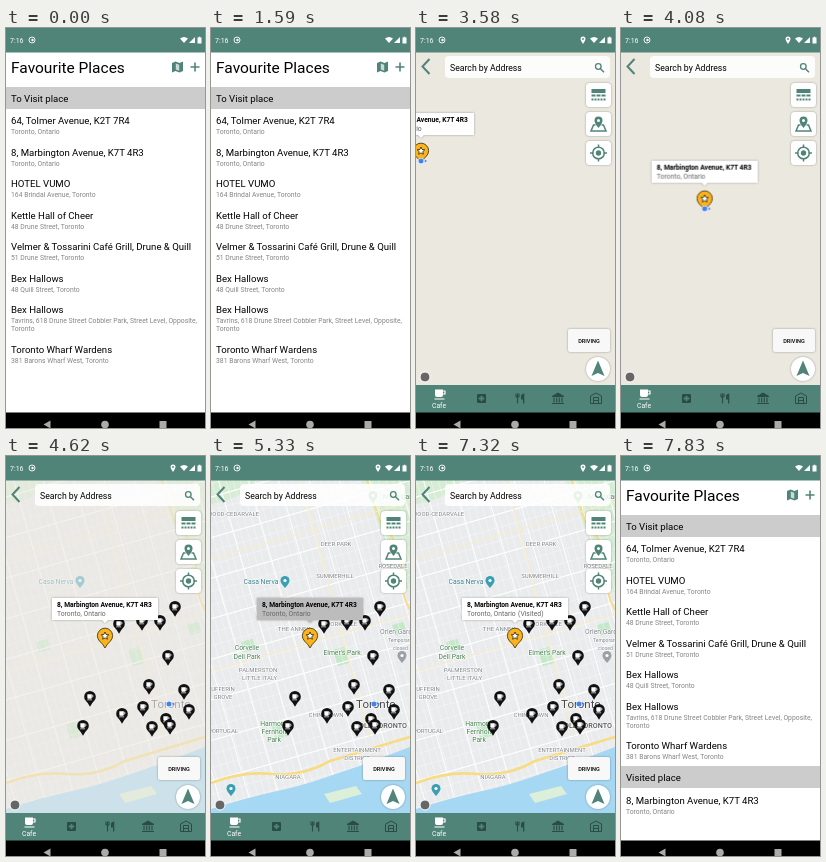
Recreate the animation shown at these times as an HTML page. Size 199 by 400 pixels, loop 8000 ms.

```html
<!DOCTYPE html>
<html lang="en">
<head>
<meta charset="utf-8">
<title>Favourite places</title>
<style>
html, body { margin: 0; width: 100%; height: 100%; overflow: hidden; background: #fff; }
svg { display: block; width: 100%; height: 100%; font-family: Roboto, Arial, sans-serif; }
.title { font-size: 15.5px; }
.name { font-size: 9.6px; }
.sub { font-size: 6.8px; fill: #858585; }
.label { font-size: 6px; fill: #7d8287; text-anchor: middle; paint-order: stroke; stroke: #fff; stroke-width: 1.2px; stroke-linejoin: round; }
.place { font-size: 6.8px; }
.start { text-anchor: start; }
.green { fill: #42804d; }
.teal { fill: #347d8b; }
.card { filter: drop-shadow(0 .7px .9px #0005); }

/* Every part shares one 8 s clock */
.screen, .tiles, .pinned, .bubble, .pan, .nearDot, .zoomed, .streets, .early, .late,
.press, .visited, .before, .after { animation: 8s step-end infinite; }
.screen { animation-name: screen; }
.tiles { animation-name: tiles; }
.pinned { animation-name: pinned; }
.bubble { animation-name: bubble; }
.pan { animation-name: pan; }
.nearDot { animation-name: nearDot; }
.zoomed { animation-name: zoomed; }
.streets { animation-name: streets; }
.early { animation-name: early; }
.late { animation-name: late; }
.press { animation-name: press; }
.visited { animation-name: visited; }
.before { animation-name: before; }
.after { animation-name: after; }

@keyframes screen {
  0% { opacity: 0; transform: translateY(24px); }
  31% { opacity: 0; transform: translateY(24px); animation-timing-function: ease-out; }
  35.625% { opacity: 1; transform: none; }
  93.625% { opacity: 1; transform: none; animation-timing-function: ease-in; }
  96.25%, 100% { opacity: 0; transform: translateY(24px); }
}
@keyframes tiles { 0% { fill: #fafafa; } 40.25%, 100% { fill: #ebe8e0; } }
@keyframes pinned { 0% { opacity: 0; } 41.75%, 100% { opacity: 1; } }
@keyframes bubble { 0% { opacity: 0; } 43.25%, 100% { opacity: 1; } }
@keyframes pan {
  0% { transform: translate(-94px, -57px); }
  46.875% { transform: translate(-94px, -57px); animation-timing-function: ease-in-out; }
  52.625%, 100% { transform: none; }
}
@keyframes nearDot { 0% { opacity: 1; } 54.625%, 100% { opacity: 0; } }
@keyframes zoomed { 0% { opacity: 0; } 55.375%, 100% { opacity: 1; } }
@keyframes streets {
  0% { opacity: 0; } 54.625% { opacity: .3; } 57.75% { opacity: .45; }
  58.75% { opacity: .6; } 60.5% { opacity: .85; } 62%, 100% { opacity: 1; }
}
@keyframes early { 0% { opacity: 0; } 55.375% { opacity: .4; } 60.5%, 100% { opacity: 1; } }
@keyframes late { 0% { opacity: 0; } 60.5% { opacity: .6; } 62%, 100% { opacity: 1; } }
@keyframes press { 0% { fill: #fff; } 66.625% { fill: #bcbcbc; } 68.125%, 100% { fill: #fff; } }
@keyframes visited { 0% { opacity: 0; } 68.125%, 100% { opacity: 1; } }
@keyframes before { 0% { opacity: 1; } 40.25%, 100% { opacity: 0; } }
@keyframes after { 0% { opacity: 0; } 40.25%, 100% { opacity: 1; } }
</style>
</head>
<body>
<svg id="stage" viewBox="0 0 199 400" preserveAspectRatio="none"></svg>
<script>
(() => {
const TEAL = '#518478', DARK = '#294c44';

const text = (x, y, cls, str, extra = '') =>
  `<text x="${x}" y="${y}" class="${cls}" ${extra}>${str.replace(/&/g, '&amp;')}</text>`;
const rect = (x, y, w, h, fill, extra = '') =>
  `<rect x="${x}" y="${y}" width="${w}" height="${h}" fill="${fill}" ${extra}/>`;
const path = (d, fill, extra = '') => `<path d="${d}" fill="${fill}" ${extra}/>`;
const line = (d, color, width, extra = '') =>
  path(d, 'none', `stroke="${color}" stroke-width="${width}" ${extra}`);
const disc = (x, y, r, fill, extra = '') => `<circle cx="${x}" cy="${y}" r="${r}" fill="${fill}" ${extra}/>`;
const at = (x, y, body) => `<g transform="translate(${x} ${y})">${body}</g>`;
const group = (cls, body) => `<g class="${cls}">${body}</g>`;

// Lists
const home = ['8, Marbington Avenue, K7T 4R3', 'Toronto, Ontario'];
const places = [
  ['64, Tolmer Avenue, K2T 7R4', 'Toronto, Ontario'],
  ['HOTEL VUMO', '164 Brindal Avenue, Toronto'],
  ['Kettle Hall of Cheer', '48 Drune Street, Toronto'],
  ['Velmer & Tossarini Café Grill, Drune & Quill', '51 Drune Street, Toronto'],
  ['Bex Hallows', '48 Quill Street, Toronto'],
  ['Bex Hallows', 'Tavrins, 618 Drune Street Cobbler Park, Street Level, Opposite,', 'Toronto'],
  ['Toronto Wharf Wardens', '381 Barons Wharf West, Toronto'],
];

function rows(items, y) {
  return items.map(([name, ...subs]) => {
    const out = text(5, y, 'name', name) + subs.map((s, i) => text(5, y + 10 + i * 8, 'sub', s)).join('');
    y += 31.5 + (subs.length - 1) * 8;
    return out;
  }).join('');
}
const section = (y, label) => rect(0, y, 199, 22, '#ccc') + text(5, y + 15, 'name', label);

const mapIcon = path('M-5.5-4l3.5-1.5 4 1.5 3.5-1.5v9.5L2 5.5-2 4-5.5 5.5z', TEAL) +
  path('M-1.7-3.6L1.7-2.3v6L-1.7 2.5z', '#fff', 'opacity=".7"');

const listScreen = rect(0, 0, 199, 400, '#fff') +
  text(5, 45, 'title', 'Favourite Places') +
  at(171.5, 39, mapIcon) + line('M184.5 39h9M189 34.5v9', TEAL, 1.6) +
  section(59, 'To Visit place') +
  group('before', rows([places[0], home, ...places.slice(1)], 96)) +
  group('after', rows(places, 96) + section(310, 'Visited place') + rows([home], 348));

// Map
const gridLine = (w, h, color, width) =>
  `<pattern id="g${w}" width="${w}" height="${h}" patternUnits="userSpaceOnUse" patternTransform="rotate(-16)">` +
  line(`M0 0H${w}M0 0V${h}`, color, width) + '</pattern>';

const parks = [[30, 186, 12, 11], [122, 194, 12, 17], [60, 268, 13, 16], [181, 169, 12, 11]]
  .map(([x, y, w, h]) => rect(x, y, w, h, '#c5e8c9', `rx="1" transform="rotate(-16 ${x} ${y})"`)).join('');

const streets = '<defs>' + gridLine(7, 13, '#fafafa', .8) + gridLine(29, 39, '#fff', 1.8) + '</defs>' +
  rect(0, 24, 199, 334, '#eaebed') +
  path('M150 24H199V137Q184 122 175 91T150 24zM0 24H45Q32 43 0 48z', '#d7ecd5') + parks +
  rect(0, 24, 199, 334, 'url(#g7)') + rect(0, 24, 199, 334, 'url(#g29)') +
  path('M0 353Q34 342 62 336T113 322L151 309 199 291V358H0z', '#a6d8f3') +
  path('M113 338L145 330 151 338 119 347z', '#dcefd9') +
  line('M0 327Q31 315 61 318T119 305L199 281', '#f7dc83', 2.6) +
  line('M199 154Q189 137 190 113T169 65L156 24', '#f7dc83', 1.8) +
  line('M0 103L199 46M0 215L199 158M90 24L158 280', '#f8edc8', 1.2);

const labels = [
  [22, 60, 'WOOD-CEDARVALE'], [125, 90, 'DEER PARK'], [124, 122, 'SUMMERHILL'], [182, 112, 'ROSEDALE'],
  [83, 175, 'THE ANNEX'], [131, 170, 'YORKVILLE'], [47, 216, 'PALMERSTON'], [47, 224, '- LITTLE ITALY'],
  [12, 235, 'UFFERIN'], [12, 243, 'GROVE'], [12, 277, 'PORTUGAL'], [115, 261, 'CHINATOWN'],
  [146, 296, 'ENTERTAINMENT'], [146, 304, 'DISTRICT'], [77, 323, 'NIAGARA'],
].map(([x, y, s]) => text(x, y, 'label', s)).join('');

const greenLabels = [
  [131, 199, "Elmer's Park"], [36, 194, 'Corvelle'], [36, 203, 'Dell Park'],
  [63, 270, 'Harmony'], [63, 278, 'Fernholt'], [63, 286, 'Park'],
].map(([x, y, s]) => text(x, y, 'label place green', s)).join('') +
  text(169, 178, 'label place start', 'Orlen Gardens') + text(172, 43, 'label place start green', 'Mt Feldan');

const spot = color => path('M0 6Q-4.5 1-4.5-1.5a4.5 4.5 0 0 1 9 0Q4.5 1 0 6z', color) + disc(0, -1.5, 1.6, '#fff');
const earlyLabels = text(50, 128, 'label place teal', 'Casa Nerva') + at(74, 126, spot('#3a9fb2')) +
  text(165, 252, 'label', 'Toronto', 'style="font-size:11.5px;fill:#444"');
const lateLabels = labels + greenLabels +
  text(172, 272, 'label', 'OLD TORONTO', 'style="font-size:7.2px;font-weight:500;fill:#555"') +
  text(177, 186, 'label start', 'Temporarily', 'style="font-size:5px"') +
  text(182, 194, 'label start', 'closed', 'style="font-size:5px"') +
  at(191, 201, spot('#9aa0a6')) + at(20, 334, spot('#3a9fb2')) + at(162, 41, spot('#6fb07c'));

const cup = path('M-3-3H2V1Q2 2-.5 2T-3 1z', '#fff') + line('M2-2H3.3V0H2M-3.2 3.2H2.4', '#fff', .8);
const cafe = '<g transform="scale(.88)">' + path('M0 11Q-2 7-5 4A6.6 6.6 0 1 1 5 4Q2 7 0 11z', '#111') + cup + '</g>';
const cafes = [
  [113, 168], [136, 165], [154, 165], [169, 151], [162, 200], [143, 229], [178, 234], [84, 241],
  [77, 270], [116, 258], [137, 251], [183, 254], [160, 263], [146, 271], [164, 269],
].map(([x, y]) => at(x, y, cafe)).join('');

const blueDot = disc(0, 0, 3, '#fff') + disc(0, 0, 2.5, '#3d83f5') + path('M3.8-1.5L6 0 3.8 1.5z', '#3d83f5');

const star = Array.from({ length: 10 }, (_, i) => {
  const r = i % 2 ? 1.9 : 4, a = i * Math.PI / 5;
  return (r * Math.sin(a)).toFixed(2) + ' ' + (-r * Math.cos(a)).toFixed(2);
}).join('L');
const homePin = path('M0 12Q-2 8-5.5 5A7.6 7.6 0 1 1 5.5 5Q2 8 0 12z', '#fbb31c', 'stroke="#4c3a12" stroke-width=".9"') +
  path(`M${star}z`, '#fff', 'stroke="#222" stroke-width=".8" stroke-linejoin="round"');

const callout = group('card', path('M46 142H152V164H102L99 167 96 164H46z', '#fff', 'class="press"')) +
  text(51, 151, '', home[0], 'font-size="6.7" font-weight="700"') +
  text(51, 160, 'place', `${home[1]}<tspan class="extra"></tspan>`.split('<')[0], 'fill="#666"') +
  text(102, 160, 'place visited', '(Visited)', 'fill="#666"');

const mapLayer = rect(0, 24, 199, 334, '#fafafa', 'class="tiles"') +
  group('streets', streets) + group('early', earlyLabels) + group('late', lateLabels) +
  group('zoomed', at(163, 248, blueDot) + cafes) +
  group('pinned', group('pan', group('bubble', callout) + at(99, 180, homePin) + group('nearDot', at(99, 190, blueDot))));

// Controls over the map
const dashes = rect(-7, -6, 14, 4, TEAL) + line('M-7 .5H7', TEAL, 1.8, 'stroke-dasharray="4 1"') +
  line('M-7 4.5H7', TEAL, 1.8, 'stroke-dasharray="2 1"');
const mapPin = line('M-3 1H-5L-7.5 7H7.5L5 1H3', TEAL, 1.5) +
  path('M0 4Q-4-.5-4-3.5a4 4 0 0 1 8 0Q4-.5 0 4z', TEAL) + disc(0, -3.5, 1.5, '#fff');
const crosshair = disc(0, 0, 5.8, 'none', `stroke="${TEAL}" stroke-width="1.5"`) + disc(0, 0, 2.7, TEAL) +
  line('M0-8.5V-5M0 5V8.5M-8.5 0H-5M5 0H8.5', TEAL, 1.5);
const tools = [dashes, mapPin, crosshair].map((icon, i) =>
  rect(170, 55 + 29 * i, 25, 24, '#fff', 'rx="3.5" class="card" opacity=".95"') + at(182.5, 67 + 29 * i, icon)).join('');

const controls = line('M13.5 31L6.5 38.5 13.5 46', TEAL, 2) +
  rect(29, 28, 165, 22, '#fff', 'rx="4" opacity=".85"') +
  text(34, 43, '', 'Search by Address', 'font-size="8.7"') +
  disc(182.3, 38.5, 2.8, 'none', `stroke="${TEAL}" stroke-width="1.3"`) + line('M184.5 40.7L188 44.2', TEAL, 1.5) +
  tools +
  rect(152, 301, 42, 23, '#f8f8f8', 'rx="2" class="card"') +
  text(173, 314.5, '', 'DRIVING', 'font-size="5.6" font-weight="500" text-anchor="middle"') +
  disc(182, 341, 12, '#fff', 'class="card" opacity=".96"') + path('M182 332.5L188.5 348 182 345 175.5 348z', TEAL) +
  disc(9, 349, 5, '#666', 'stroke="#fff"');

const tabs = rect(0, 357, 199, 28, TEAL) +
  path('M19 361.5H27V367Q27 369 25 369H21Q19 369 19 367z', '#fff') +
  line('M27 363H29V366H27M18.5 371H28.5', '#fff', 1.2) +
  text(23, 379.5, '', 'Cafe', 'font-size="6.8" fill="#fff" text-anchor="middle"') +
  at(65.5, 370.5, rect(-4.5, -4.5, 9, 9, DARK, 'rx="1"') + line('M-2.8 0H2.8M0-2.8V2.8', TEAL, 1.8)) +
  at(104, 370.5, line('M-4-5V-1.5M-2.5-5V5M-1-5V-1.5M-4.2-1.5H-.8', DARK, 1.1) + path('M1-3Q2-5 4.3-5V5H3V1H1z', DARK)) +
  at(142, 370.5, path('M-6-2.5L0-6 6-2.5V-1.5H-6z', DARK) +
    line('M-4-1V4M-1.3-1V4M1.3-1V4M4-1V4M-6 5H6', DARK, 1.1)) +
  at(180, 370.5, line('M-5.5-2.5L0-5.5 5.5-2.5V5H-5.5zM-2.5 5V-1H2.5V5M-2.5 2H2.5', DARK, 1));

const gpsIcon = path('M167 16Q164.5 12.5 164.5 11a2.5 2.5 0 0 1 5 0Q169.5 12.5 167 16z', '#fff') + disc(167, 11, .9, TEAL);

// System bars
const topBar = rect(0, 0, 199, 24.5, TEAL) +
  text(4, 15, '', '7:16', 'font-size="7" fill="#fff"') +
  disc(26, 12, 3, 'none', 'stroke="#fff" stroke-width=".9"') + disc(26.5, 12, 1.2, '#fff') +
  path('M174 10.5Q178 7.5 182 10.5L178 15z', '#fff') + path('M183 15H189V9z', '#fff') +
  path('M191.5 9.5H192.7V8.7H194.3V9.5H195.5V15.5H191.5z', '#fff');
const navBar = rect(0, 384.5, 199, 15.5, '#000') +
  path('M37.5 396.5L44.5 392.5V400.5z', '#aaa') + disc(99, 396.5, 3.8, '#aaa') + rect(153.5, 393, 7, 7, '#aaa');

document.getElementById('stage').innerHTML =
  listScreen + group('screen', mapLayer + controls + tabs) + topBar + group('screen', gpsIcon) + navBar;
})();
</script>
</body>
</html>
```
